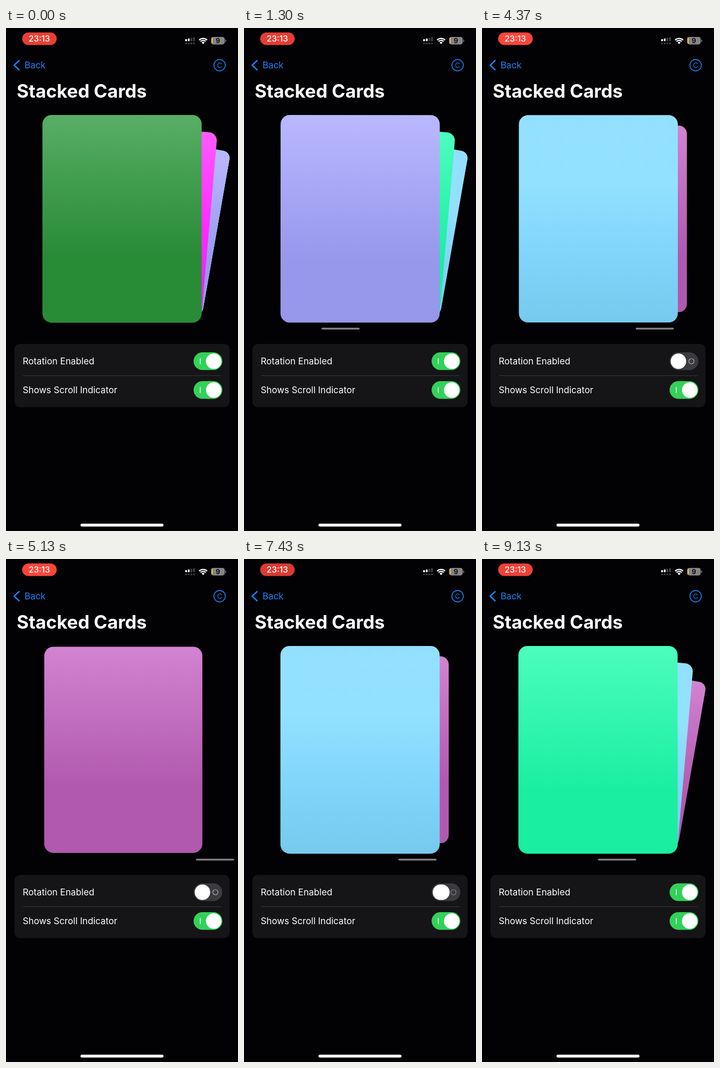
An HTML page with a canvas that plays this animation: 444x960 px, repeating every 9.23 s.

```html
<!DOCTYPE html>
<html lang="en">
<head>
<meta charset="utf-8">
<title>Stacked Cards</title>
<style>
  html, body { margin: 0; width: 100%; height: 100%; overflow: hidden; background: #020103; }
  canvas { display: block; width: 444px; height: 960px; }
</style>
</head>
<body>
<canvas id="stage" width="444" height="960"></canvas>
<script>
const ctx = document.getElementById('stage').getContext('2d');
const LOOP = 9230, WIDTH = 444, BLUE = '#1684f8';
const CARD = { x: 69.7, y: 166, w: 304.8, h: 396.4, r: 17.5 };
const CENTER_Y = CARD.y + CARD.h / 2;

// Gradient stops per card: [offset, colour]
const CARDS = [
  [[0, '#58ae65'], [.68, '#288b36'], [1, '#288b36']],
  [[0, '#ff5aff'], [.5, '#ff2dff'], [1, '#ea1eec']],
  [[0, '#b9b8ff'], [.7, '#9797ec'], [1, '#9797ec']],
  [[0, '#4cfdbe'], [.7, '#1aeea1'], [1, '#1aeea1']],
  [[0, '#93dfff'], [.32, '#92e1ff'], [.65, '#82d5fb'], [1, '#76caee']],
  [[0, '#d283d1'], [.68, '#b159af'], [1, '#b159af']]
];

// Paging swipes: start, direction, time constant
const SWIPES = [
  [20, 1, 58], [890, 1, 56], [1760, 1, 50], [3890, 1, 80],
  [4960, 1, 40], [6540, -1, 42], [8460, -1, 58]
];
const INDICATOR_SPANS = [[30, 3140], [3900, 6110], [6560, 7770], [8470, 9400]];
const TOUCHES = [3140, 7370], TOUCH_TIME = 140;
const PILL_LEVELS = [
  [0, .915], [650, .9], [1570, .9], [2330, .985], [3130, .985], [3900, 1],
  [6560, 1], [7230, .86], [8470, .86], [9130, .94], [9230, .94]
];

const clamp = v => Math.min(1, Math.max(0, v));
const mix = (a, b, k) => a + (b - a) * k;
const smooth = v => { v = clamp(v); return v * v * (3 - 2 * v); };

function scrollPage(t) {
  return SWIPES.reduce((page, [start, dir, tau]) => {
    const x = Math.max(0, t - start) / tau;
    return page + dir * (1 - (1 + x) * Math.exp(-x));
  }, 0);
}

function track(keys, t) {
  const i = Math.max(1, keys.findIndex(k => k[0] >= t));
  const [t0, a] = keys[i - 1], [t1, b] = keys[i];
  return mix(a, b, clamp((t - t0) / (t1 - t0)));
}

function box(x, y, w, h, r, fill) {
  ctx.beginPath();
  ctx.roundRect(x, y, w, h, r);
  ctx.fillStyle = fill;
  ctx.fill();
}

function label(text, x, y, size, weight = 400, color = '#fff', align = 'left') {
  ctx.font = `${weight} ${size}px Inter, sans-serif`;
  ctx.textAlign = align;
  ctx.fillStyle = color;
  ctx.fillText(text, x, y);
}

function stroke(color, width, trace) {
  ctx.beginPath();
  trace();
  ctx.strokeStyle = color;
  ctx.lineWidth = width;
  ctx.stroke();
}

function drawCard(index, page, rotates) {
  const progress = Math.min(index - page, 2);
  if (progress < -1.1) return;
  const scale = 1 - progress * .1;
  const slide = Math.min(0, progress) * WIDTH + progress * (rotates ? 8.26 : 10.33);
  ctx.save();
  ctx.translate(WIDTH / 2 + slide, CENTER_Y);
  if (rotates) ctx.rotate(progress * 5 * Math.PI / 180);
  // Scaling is anchored to the right edge of the page
  ctx.translate(WIDTH / 2, 0);
  ctx.scale(scale, scale);
  ctx.translate(-WIDTH, -CENTER_Y);
  const fill = ctx.createLinearGradient(0, CARD.y, 0, CARD.y + CARD.h);
  CARDS[index].forEach(([at, color]) => fill.addColorStop(at, color));
  box(CARD.x, CARD.y, CARD.w, CARD.h, CARD.r, fill);
  ctx.restore();
}

function drawScroller(t) {
  const page = scrollPage(t);
  const rotates = t < TOUCHES[0] + TOUCH_TIME || t >= TOUCHES[1] + TOUCH_TIME;
  ctx.save();
  ctx.beginPath();
  ctx.rect(0, 152, WIDTH, 425);
  ctx.clip();
  for (let i = CARDS.length - 1; i >= 0; i--) drawCard(i, page, rotates);
  const span = INDICATOR_SPANS.findLast(([start]) => t >= start);
  if (span) {
    ctx.globalAlpha = 1 - clamp((t - span[1]) / 260);
    box(1.8 + page * 73.4, 572, 73.2, 3.5, 1.75, '#7f7f80');
  }
  ctx.restore();
}

function drawSwitch(y, on, press) {
  const green = [51, 209, 90], gray = [59, 58, 62];
  const tint = gray.map((c, i) => Math.round(mix(c, green[i], on)));
  const stretch = 7 * press;
  box(359, y, 55, 33.8, 16.9, `rgb(${tint})`);
  ctx.globalAlpha = on;
  box(371, y + 11.5, 1.4, 11, 0, '#fff');
  ctx.globalAlpha = (1 - on) * (1 - press);
  stroke('#b5b5b8', 1.2, () => ctx.arc(400.8, y + 17, 5, 0, 7));
  ctx.globalAlpha = 1;
  box(mix(361.2, 382.7 - stretch, on), y + 2.2, 29.5 + stretch, 29.5, 14.75, '#fff');
}

function drawSettings(t) {
  box(16, 603, 412, 120.5, 10.5, '#151416');
  box(32.5, 663, 379.5, 1, 0, '#39383b');
  label('Rotation Enabled', 32, 642.3, 17.2);
  label('Shows Scroll Indicator', 32, 697.3, 17.2);
  const [off, back] = TOUCHES.map(start => smooth((t - start - TOUCH_TIME) / 230));
  const press = TOUCHES.reduce((sum, start) =>
    sum + smooth((t - start) / TOUCH_TIME) * (1 - smooth((t - start - TOUCH_TIME) / 260)), 0);
  drawSwitch(619, 1 - off + back, press);
  drawSwitch(674, 1, 0);
}

function drawStatusBar(t) {
  const level = track(PILL_LEVELS, t);
  const red = [255, 69, 58].map(c => Math.round(c * level));
  box(31, 8.5, 66, 24, 12, `rgb(${red})`);
  label('23:13', 63.8, 26.2, 15.8, 500, '#fff', 'center');

  for (let i = 0; i < 4; i++) {
    const x = 343 + i * 5, height = 4 + i * 1.3;
    box(x, 25.3 - height, 3.4, height, .8, i < 2 ? '#fff' : '#414043');
    box(x, 27.8, 3.4, 3.2, .8, '#414043');
  }

  const wave = r => ctx.arc(377.2, 30.5, r, -Math.PI * .755, -Math.PI * .245);
  stroke('#fff', 2.4, () => wave(10.6));
  stroke('#fff', 2.4, () => wave(6.9));
  ctx.beginPath();
  ctx.moveTo(377.2, 30.8);
  wave(4);
  ctx.fillStyle = '#fff';
  ctx.fill();

  ctx.save();
  ctx.beginPath();
  ctx.roundRect(393, 17, 25.6, 14.4, 4.4);
  ctx.clip();
  box(393, 17, 26, 15, 0, '#858487');
  box(393, 17, 2.2, 15, 0, '#ffd426');
  ctx.restore();
  box(419.6, 21.8, 1.6, 5, [0, 1.6, 1.6, 0], '#858487');
  label('9', 405.6, 28.7, 12.5, 700, '#100f11', 'center');
}

function drawNavigation() {
  ctx.lineCap = ctx.lineJoin = 'round';
  stroke(BLUE, 2.6, () => {
    ctx.moveTo(25, 62.2);
    ctx.lineTo(15.6, 71);
    ctx.lineTo(25, 79.8);
  });
  ctx.lineCap = 'butt';
  label('Back', 35.6, 77.2, 17.2, 400, BLUE);
  stroke(BLUE, 1.6, () => ctx.arc(408.8, 71, 10.9, 0, 7));
  label('C', 408.8, 75.9, 13.6, 400, BLUE, 'center');
  label('Stacked Cards', 20.5, 133, 35, 700);
}

function draw(t) {
  ctx.fillStyle = '#020103';
  ctx.fillRect(0, 0, WIDTH, 960);
  drawStatusBar(t);
  drawNavigation();
  drawScroller(t);
  drawSettings(t);
  box(142.5, 946, 159, 5.4, 2.7, '#fff');
}

function tick() {
  draw(performance.now() % LOOP);
  requestAnimationFrame(tick);
}
tick();
</script>
</body>
</html>
```
